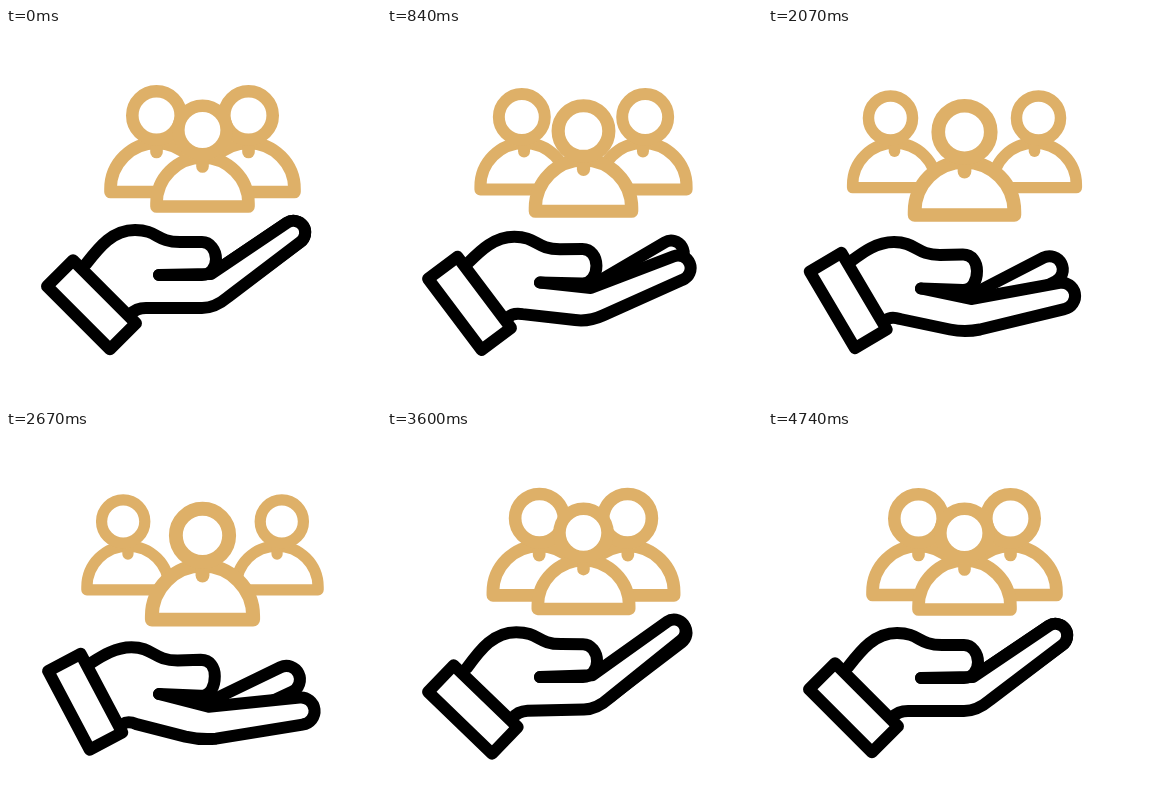
Write an HTML page that moves like this. It is 375x375 px and loops after 4950 ms.

```html
<!DOCTYPE html>
<html lang="en">
<head>
<meta charset="utf-8">
<title>Hand holding a group</title>
<style>
  html, body { margin: 0; width: 100%; height: 100%; overflow: hidden; background: #fff; }
  svg { display: block; width: 100vw; height: 100vh; }
  path, circle { fill: #fff; stroke-linecap: round; stroke-linejoin: round; }
  .people { stroke: #deb068; stroke-width: 12.6; }
  .hand { stroke: #000; stroke-width: 12; }
  .line { fill: none; }
</style>
</head>
<body>
<svg viewBox="0 0 375 375">
  <defs>
    <path id="torso" d="M-46 76.5V73.5A46 46 0 0 1 46 73.5V76.5Z"/>
    <path id="tie" class="line" d="M0 28V36.5"/>
    <circle id="face" r="24.2"/>
  </defs>
  <g class="people">
    <g id="left"><g class="body"><use href="#torso"/><use href="#tie"/></g><use href="#face"/></g>
    <g transform="matrix(-1 0 0 1 393 0)"><use href="#left"/></g>
    <g id="mid"><use href="#torso"/><use href="#tie"/><use href="#face"/></g>
  </g>
  <g class="hand">
    <path id="rear"/>
    <path id="palm"/>
    <path id="thumb" class="line"/>
    <path id="cuff" d="M-44.5 -18.4H44.5V18.4H-44.5Z"/>
  </g>
</svg>
<script>
const LOOP = 4950, STEP = 30;
// [time in ms, openness]: 0 is closed, 1 is open, beyond is overshoot
const keys = [
  [180, 0], [540, .28], [840, .56], [1230, .87], [1620, .98], [2070, 1],
  [2310, 1.04], [2610, 1.2], [2880, 1.03], [3060, .72], [3420, .19],
  [3600, -.07], [3900, -.2], [4200, -.15], [4470, -.06], [4740, 0]
];
const $ = id => document.getElementById(id);
const body = document.querySelector('.body');
const mix = (a, b, p) => a + (b - a) * p;

function slope(i) {
  const a = keys[i - 1], b = keys[i], c = keys[i + 1];
  if (!a || !c || (b[1] - a[1]) * (c[1] - b[1]) <= 0) return 0;
  return (c[1] - a[1]) / (c[0] - a[0]);
}

function openness(t) {
  if (t <= keys[0][0] || t >= keys[keys.length - 1][0]) return 0;
  const i = keys.findIndex(k => k[0] > t) - 1;
  const [t0, a] = keys[i], [t1, b] = keys[i + 1];
  const d = t1 - t0, u = (t - t0) / d, v = 1 - u;
  return a * v * v * (1 + 2 * u) + b * u * u * (3 - 2 * u)
    + d * (slope(i) * u * v * v - slope(i + 1) * u * u * v);
}

// Rounded fingertip: both ends of a half circle around (x, y)
function tip(x, y, r, deg) {
  const a = deg * Math.PI / 180, dx = r * Math.sin(a), dy = -r * Math.cos(a);
  return { up: [x + dx, y + dy], low: [x - dx, y - dy], r };
}

function draw(t) {
  const p = openness(t);
  const sag = Math.max(0, -p) * 26;
  const pt = (x0, y0, x1, y1, dy = 0) => [mix(x0, x1, p), mix(y0, y1, p) + dy];

  const side = 1 - .09 * p, mid = 1 + .085 * p;
  $('left').setAttribute('transform',
    `translate(${150.5 - 28 * p} ${87.5 + 2.5 * p}) scale(${side})`);
  body.setAttribute('transform', `translate(${4 * p / side} 0)`);
  $('mid').setAttribute('transform', `translate(196.5 ${102 + 2 * p}) scale(${mid})`);

  const r = 11.7 + 1.6 * p;
  const back = tip(...pt(287.5, 204.5, 281.5, 241.5), r, -34 + 7 * p);
  const front = tip(...pt(287.5, 204.5, 293.8, 268), r, -34 + 23 * p);
  const end = pt(153, 247, 153, 260.5);

  $('rear').setAttribute('d',
    `M${pt(205, 246, 205, 266)}L${back.up}A${r} ${r} 0 0 1 ${back.low}L${pt(222, 268, 222, 287)}`);

  $('palm').setAttribute('d',
    `M${pt(125, 286, 118, 292, sag)}Q${pt(130, 280, 123, 288, sag / 2)} ${pt(140, 280, 132, 291, sag / 3)}`
    + `L${pt(196, 280, 182, 301.5)}Q${pt(209, 280, 197, 304.5)} ${pt(222, 269, 212, 301.5)}`
    + `L${front.low}A${r} ${r} 0 0 0 ${front.up}L${pt(205, 246, 203, 271)}L${end}`);

  $('thumb').setAttribute('d',
    `M${pt(80, 236, 82, 234, sag / 2)}C${pt(94, 218, 94, 225)} ${pt(107, 202, 108, 214)} ${pt(129, 202, 126, 214)}`
    + `C${pt(152, 202, 148, 214)} ${pt(150, 214, 148, 227)} ${pt(174, 214, 172, 227)}`
    + `L${pt(196, 214, 195, 226.5)}C${pt(204, 214, 204, 226.5)} ${pt(210, 222, 209, 234)} ${pt(210, 231, 209, 243)}`
    + `S${pt(204, 247, 205, 262)} ${pt(196, 247, 195, 262)}L${end}`);

  $('cuff').setAttribute('transform',
    `translate(${85.5 - 5.3 * p} ${276.7 - 4.2 * p * p + sag}) rotate(${45 + 14.4 * p})`);
}

function tick(now) {
  draw(Math.floor(now % LOOP / STEP) * STEP);
  requestAnimationFrame(tick);
}
draw(0);
requestAnimationFrame(tick);
</script>
</body>
</html>
```
